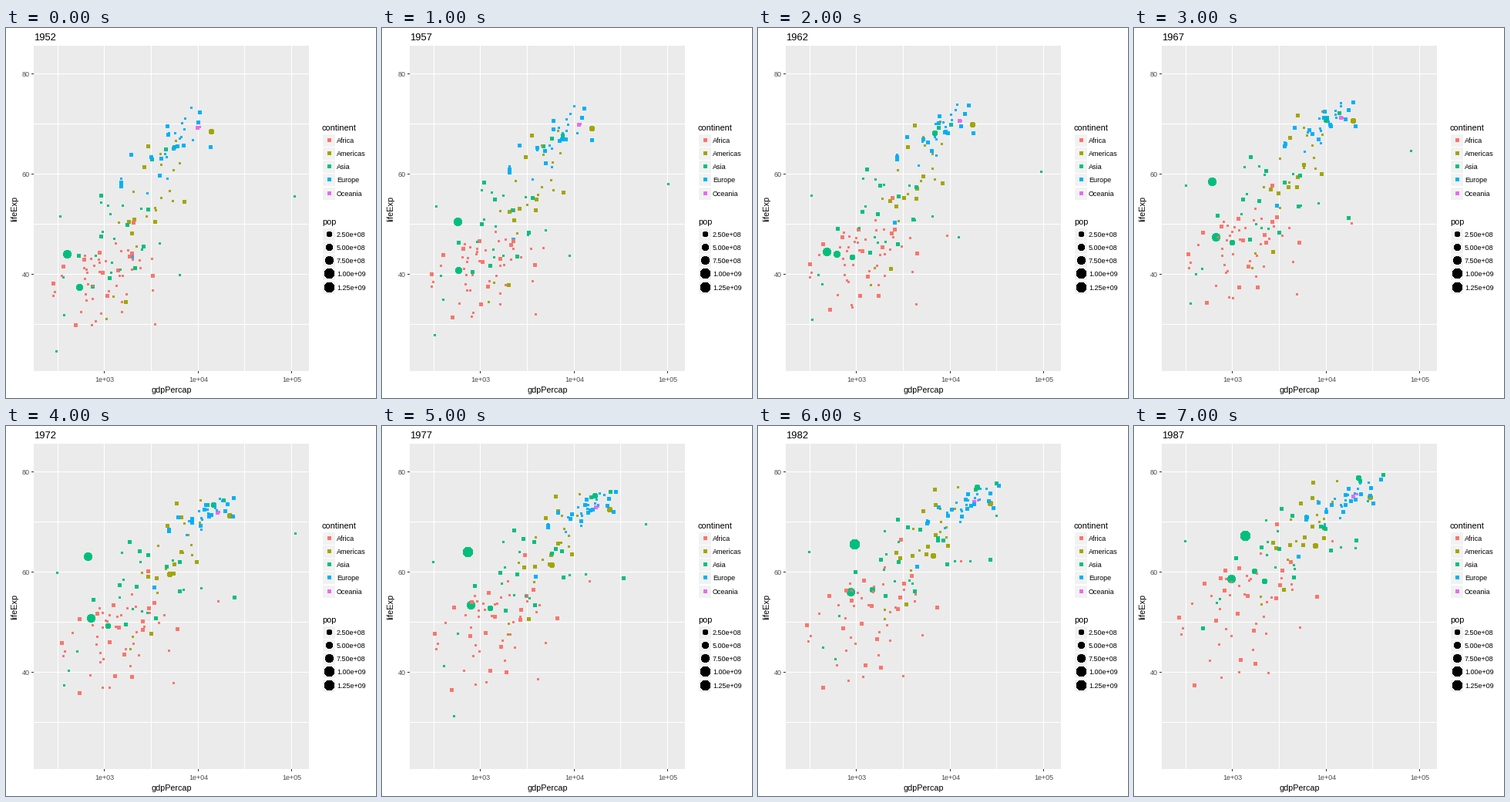
Write a matplotlib script that moves like this. It is 480x480 px and loops after 8 s.

```python
import numpy as np
import matplotlib.pyplot as plt
from matplotlib.animation import FuncAnimation
from matplotlib.patches import Rectangle

SIZE = 480
STEPS = np.arange(8)
CONTINENTS = {"Africa": "#F8766D", "Americas": "#A3A500", "Asia": "#00BF7D",
              "Europe": "#00B0F6", "Oceania": "#E76BF3"}

rng = np.random.default_rng(12)
bubbles = []


def dot_area(size):
    """Marker area for a radius rounded to whole pixels."""
    radius = np.floor(1.067 * np.asarray(size) + 0.5)
    return (2 * radius + 0.4) ** 2


def pop_area(millions):
    return dot_area(1 + 5 * np.sqrt(np.asarray(millions) / 1318.7))


def add(continent, log_gdp, life, pop):
    x = 127.4 + (log_gdp - 3) * 121.5
    y = 59.5 + (80 - life) * 6.5
    pixels = np.floor(np.column_stack([x, y])) + 0.5
    bubbles.append((CONTINENTS[continent], pixels, pop_area(pop)))


def path(continent, pop, *knots):
    """One bubble through (step, income, life expectancy) knots."""
    at, gdp, life = zip(*knots)
    add(continent, np.interp(STEPS, at, np.log10(gdp)),
        np.interp(STEPS, at, life), np.interp(STEPS, [0, 7], pop))


def normal(n):
    z = rng.normal(size=n)
    return np.clip((z - z.mean()) / z.std(), -1.9, 1.9)


def group(continent, n, gdp, gdp_spread, life, life_spread, corr, pop, decay, growth):
    """A correlated cloud whose mean and spread move through three knots."""
    gdp, gdp_spread, life, life_spread = (
        np.interp(STEPS, [0, 4, 7], k) for k in (gdp, gdp_spread, life, life_spread))
    t = STEPS / 7
    wealth, health, drift = normal(n), normal(n), normal(n)
    for rank in range(n):
        w = wealth[rank] + 0.3 * drift[rank] * t
        h = corr * w + np.sqrt(1 - corr ** 2) * health[rank]
        add(continent, gdp + gdp_spread * w, life + life_spread * h,
            pop * np.exp(-decay * rank) * growth ** t)


# The two southern bubbles, then the largest and the most wayward ones
group("Oceania", 2, (4.01, 4.22, 4.31), (0.01, 0.01, 0.03), (69.3, 71.9, 75.3),
      (0.2, 0.1, 1), 0.9, 8.7, 1.5, 1.8)
path("Asia", (556, 1084), (0, 400, 44), (1, 576, 50.5), (2, 488, 44.5),
     (3, 613, 58.4), (4, 677, 63.1), (5, 741, 64), (6, 962, 65.5), (7, 1379, 67.3))
path("Asia", (372, 788), (0, 547, 37.4), (4, 724, 50.7), (7, 977, 58.6))
path("Asia", (86, 122), (0, 3217, 63), (4, 14779, 73.4), (7, 22376, 78.7))
path("Asia", (82, 169), (0, 750, 37.5), (4, 1111, 49.2), (7, 1748, 60.1))
path("Asia", (4, 15), (0, 6460, 39.9), (5, 34168, 58.7), (7, 21198, 66.3))
path("Asia", (5, 8), (0, 368, 39.4), (4, 422, 40.3), (5, 525, 31.2), (7, 684, 53.9))
path("Asia", (0.2, 2), (0, 108382, 55.6), (2, 95458, 60.5), (3, 80895, 64.6),
     (4, 109348, 67.7), (6, 31354, 71.3), (7, 28118, 74.2))
path("Africa", (1, 4), (0, 2388, 42.7), (3, 18773, 50.2), (7, 11771, 66.2))
path("Africa", (4, 8), (0, 3521, 30), (4, 5473, 37.9), (7, 2430, 39.9))
path("Americas", (158, 243), (0, 13990, 68.4), (4, 21806, 71.3), (7, 29884, 75))
path("Americas", (57, 143), (0, 2109, 50.9), (4, 4986, 59.5), (7, 7807, 65.2))
path("Europe", (22, 53), (0, 1969, 43.6), (4, 3451, 57), (7, 5089, 63.1))

group("Africa", 50, (2.99, 3.14, 3.12), (0.28, 0.3, 0.34), (39.3, 47.5, 53.2),
      (5, 5.8, 7.5), 0.45, 33, 0.12, 2.4)
group("Americas", 23, (3.48, 3.71, 3.75), (0.24, 0.22, 0.22), (53, 62.2, 67.8),
      (8.8, 7, 5.6), 0.65, 35, 0.2, 2.1)
group("Asia", 26, (3.12, 3.4, 3.6), (0.33, 0.43, 0.47), (47.5, 57.8, 65.5),
      (9, 8, 6.5), 0.6, 47, 0.17, 2.1)
group("Europe", 29, (3.68, 4.06, 4.19), (0.26, 0.2, 0.22), (65.1, 71.2, 74),
      (4.7, 2, 2.3), 0.75, 69, 0.15, 1.2)

plt.rcParams["font.family"] = "Liberation Sans"
fig = plt.figure(figsize=(SIZE / 72, SIZE / 72), dpi=72, facecolor="white")
ax = fig.add_axes([0, 0, 1, 1])
ax.set(xlim=(0, SIZE), ylim=(SIZE, 0))
ax.axis("off")


def box(x, y, w, h, color):
    ax.add_patch(Rectangle((x, y), w, h, facecolor=color, linewidth=0,
                           antialiased=False, zorder=1))


def label(x, y, text, size=9, color="black", **kw):
    return ax.text(x, y, text, fontsize=size, color=color, **kw)


def dots(points, areas, colors):
    return ax.scatter(*np.transpose(points), s=areas, c=colors, linewidths=0,
                      antialiased=False, zorder=3)


# Panel, grid and axes
box(36, 23, 357, 422, "#EBEBEB")
for x in (67, 127, 188, 249, 309, 370):
    box(x, 23, 1, 422, "white")
for y in range(59, 385, 65):
    box(36, y, 357, 1, "white")
for x, text in zip((127, 249, 370), ("1e+03", "1e+04", "1e+05")):
    box(x, 445, 1, 3, "#333333")
    label(x + 0.5, 459, text, color="#4D4D4D", ha="center")
for y, text in zip((59, 189, 319), ("80", "60", "40")):
    box(33, y, 3, 1, "#333333")
    label(31, y + 4, text, color="#4D4D4D", ha="right")
label(215, 473, "gdpPercap", 10.8, ha="center")
label(16, 234, "lifeExp", 11, rotation=90, ha="right", va="center")
title = label(36, 16.5, "", 13)


def legend(top, heading, names, areas, colors):
    label(410, top - 4, heading, 11)
    tops = np.floor(top + 17.28 * np.arange(len(names)))
    for y, name in zip(tops, names):
        box(411, y + 1, 16, 16, "#F2F2F2")
        label(429, y + 12, name)
    dots([(419.5, y + 8.5) for y in tops], areas, colors)


legend(137, "continent", list(CONTINENTS), dot_area(1.5),
       list(CONTINENTS.values()))
pops = 250 * np.arange(1, 6)
legend(259, "pop", [f"{p * 1e6:.2e}" for p in pops], pop_area(pops), ["black"] * 5)

colors, tracks, areas = zip(*bubbles)
tracks, areas = np.array(tracks), np.array(areas)
cloud = dots(tracks[:, 0], areas[:, 0], list(colors))


def update(step):
    title.set_text(str(1952 + 5 * step))
    cloud.set_offsets(tracks[:, step])
    cloud.set_sizes(areas[:, step], dpi=72)
    return title, cloud


anim = FuncAnimation(fig, update, frames=len(STEPS), interval=1000,
                     repeat=True, repeat_delay=0)
plt.show()
```
